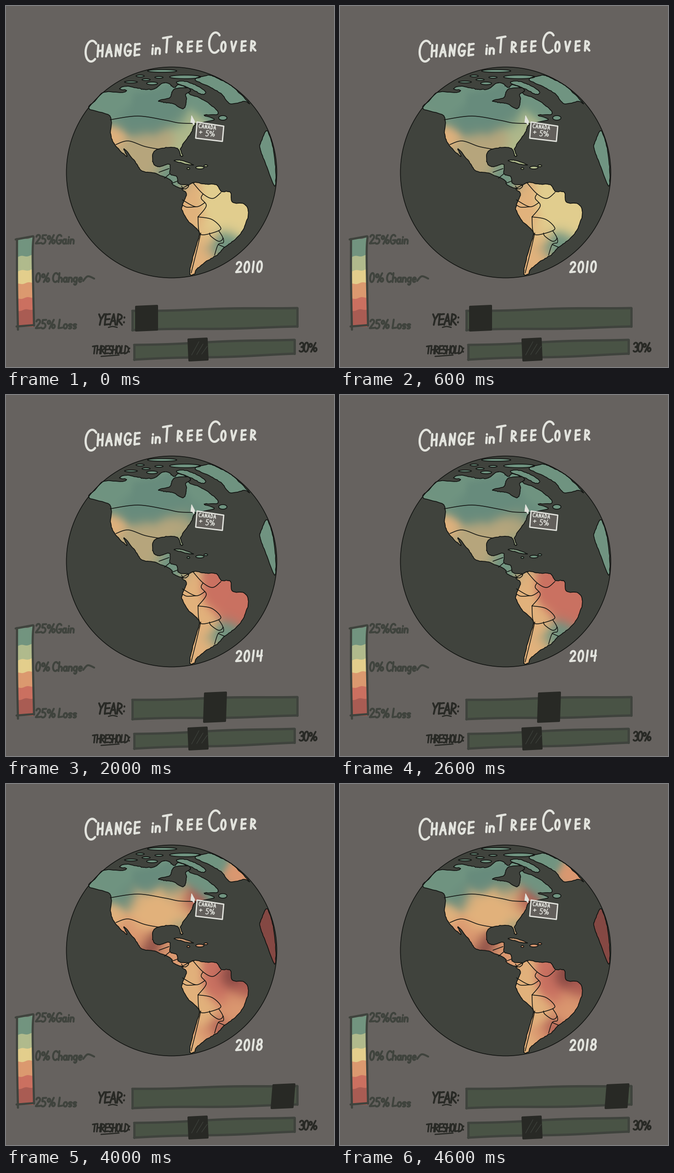
A matplotlib script that plays this animation: 714x784 px, repeating every 5000 ms.

```python
from itertools import count

import numpy as np
import matplotlib.pyplot as plt
from matplotlib.animation import FuncAnimation
from matplotlib.collections import LineCollection
from matplotlib.patches import Circle, PathPatch, Polygon
from matplotlib.path import Path

W, H, DPI = 714, 784, 64
PX = 72 / DPI

BACK, SEA, INK = "#66625f", "#40433d", "#121412"
CHALK, EDGE, BAR, DARK = "#e2e3dd", "#3f433d", "#495345", "#282925"

SHADES = dict(teal="#709481", pine="#678b7c", green="#b0ba8c", sand="#e2ce8f",
              tan="#b7a67c", moss="#a8a47d", peach="#e2b27c", orange="#db9870",
              red="#ca7161", brick="#ac5b52", wine="#854843")

rng = np.random.default_rng(4)
layer = count(2)

# ---- curves -----------------------------------------------------------


def line(*flat):
    return np.reshape(np.array(flat, float), (-1, 2))


def arc(cx, cy, rx, ry, start=0, end=360):
    a = np.radians(np.linspace(start, end, 24))
    return np.column_stack([cx + rx * np.cos(a), cy + ry * np.sin(a)])


def join(*parts):
    return np.vstack(parts)


def curve(*flat, closed=False):
    """Catmull-Rom spline through the given points."""
    p = line(*flat)
    p = join(p[-1], p, p[:2]) if closed else join(p[0], p, p[-1])
    t = np.linspace(0, 1, 8, endpoint=False)[:, None]
    out = [.5 * (2 * b + (c - a) * t + (2 * a - 5 * b + 4 * c - d) * t**2
                 + (3 * b - a - 3 * c + d) * t**3)
           for a, b, c, d in zip(p, p[1:], p[2:], p[3:])]
    return join(*out, p[-2])


def coast(*flat):
    """Closed shore with a slightly shaky pen."""
    p = curve(*flat, closed=True)
    p[:-1] += rng.normal(0, .35, p[:-1].shape)
    p[-1] = p[0]
    return p


# ---- pen letters on a grid ten units high: (width, strokes) -----------
STEM = line(.5, 0, .4, 10)
BOWL = arc(2.1, 7.4, 1.7, 2.5, -20, -340)
ARCH = join(arc(2.2, 7, 1.7, 2, 180, 360), line(3.9, 9.8))
RING = arc(2.5, 5, 2.2, 5, -70, 290)
HOOK = arc(3.2, 5, 2.9, 5, -45, -310)
SNAKE = join(arc(2.4, 2.6, 1.9, 2.5, -30, -270), arc(2, 7.4, 2, 2.6, -90, 120))


def bars(*heights):
    return [line(.4, y, 4.4, y - .4) for y in heights]


def small(stroke):
    return stroke * (.85, .5) + (0, 5)


GLYPHS = {
    " ": (1, []),
    "0": (5, [RING]),
    "1": (1.8, [line(1, 0, .8, 10)]),
    "2": (5, [join(arc(2.4, 2.5, 2.1, 2.4, 190, 390), line(.4, 9.6, 5, 9.3))]),
    "3": (4.6, [join(arc(2, 2.5, 2, 2.4, 200, 450), arc(2.2, 7.3, 2.4, 2.6, -90, 140))]),
    "4": (5, [line(.6, .5, .4, 5.5, 4.8, 5), line(4.2, 0, 4, 10)]),
    "5": (5, [join(line(4.8, .3, 1, .5, .8, 4.2), arc(2, 7, 2.6, 2.9, -110, 140))]),
    "6": (5, [join(line(3.6, 0), arc(2.6, 7.2, 2.1, 2.7, 190, -150))]),
    "8": (5, [arc(2.6, 2.4, 1.8, 2.4), arc(2.5, 7.3, 2.2, 2.7)]),
    "%": (9, [arc(1.8, 3, 1.4, 1.8), line(7, .2, 3, 10), arc(7.3, 7.6, 1.5, 2)]),
    "+": (4, [line(2, 3, 2, 7), line(0, 5, 4, 5)]),
    ":": (1.2, [line(.6, y, .6, y + .4) for y in (3, 7.4)]),
    "A": (5, [line(0, 10, 2.4, 0, 5, 10), line(1, 6.5, 4.3, 6.2)]),
    "C": (5.2, [HOOK]),
    "D": (5, [STEM, arc(.6, 5, 4.2, 4.8, -90, 90)]),
    "E": (4.4, [STEM, *bars(.4, 5, 9.8)]),
    "G": (5.8, [HOOK, line(3, 6, 5.8, 5.8, 5, 9)]),
    "H": (4.8, [STEM, STEM + (4, 0), *bars(5.2)]),
    "L": (4.6, [line(1, 0, .5, 9.6, 4.6, 9)]),
    "N": (5, [line(.4, 10, .7, .4, 4.2, 9.6, 4.8, 0)]),
    "O": (5, [RING]),
    "R": (5, [STEM, arc(.6, 2.8, 3.6, 2.6, -90, 90), line(.8, 5.4, 5, 10)]),
    "S": (4.2, [SNAKE]),
    "T": (5.4, [line(0, .8, 5.4, 0), line(2.8, .4, 2.6, 10)]),
    "V": (5, [line(0, 0, 2.2, 10, 5, 0)]),
    "Y": (5, [line(.2, .2, 2.5, 4.8), line(5, 0, 2.4, 5.2, 1.8, 10)]),
    "a": (4.4, [BOWL, line(3.8, 5, 3.8, 8.5, 4.4, 9.8)]),
    "e": (4.4, [join(line(.5, 7.3, 3.6, 7), arc(2.1, 7.4, 1.7, 2.5, -10, -310))]),
    "g": (4.4, [BOWL, join(line(3.8, 5), arc(2.4, 11, 1.4, 2, 0, 140))]),
    "h": (4.2, [STEM, ARCH]),
    "i": (1.6, [line(.9, 5, .8, 9.8), line(1, 2.4, 1, 2.7)]),
    "n": (4.2, [line(.5, 5, .4, 9.8), ARCH]),
    "o": (4.2, [small(RING)]),
    "s": (3.8, [small(SNAKE)]),
}

# ---- shores and borders -----------------------------------------------
MAINLAND = coast(
    181, 223, 196, 204, 214, 187, 252, 188, 262, 183, 247, 180, 262, 174, 285, 178,
    301, 181, 323, 180, 340, 168, 354, 168, 366, 177, 376, 171, 397, 178, 399, 191,
    420, 199, 446, 215, 462, 234, 431, 237, 453, 247, 413, 257, 402, 277, 381, 308,
    385, 325, 380, 325, 373, 309, 344, 308, 322, 317, 320, 340, 332, 349, 356, 344,
    357, 364, 372, 371, 376, 386, 397, 389, 389, 397, 365, 389, 357, 377, 323, 363,
    296, 358, 281, 338, 257, 310, 263, 327, 239, 304, 228, 280, 226, 239)
SOUTH = coast(
    383, 398, 397, 389, 411, 383, 434, 387, 458, 388, 469, 403, 488, 404, 493, 426,
    518, 430, 528, 448, 518, 482, 502, 504, 476, 524, 459, 541, 434, 556, 414, 573,
    411, 581, 401, 583, 403, 560, 414, 520, 420, 490, 396, 466, 383, 438, 393, 408)
GREENLAND = coast(411, 160, 433, 152, 450, 152, 487, 171, 507, 188, 530, 212,
                  519, 207, 488, 212, 470, 192, 446, 177)
AFRICA = coast(568, 271, 555, 296, 553, 309, 566, 345, 585, 391, 587, 355, 580, 303)
BAFFIN = coast(371, 167, 386, 163, 411, 171, 434, 186, 427, 192, 405, 181)
BAY = coast(332, 206, 356, 199, 362, 186, 370, 179, 397, 178, 401, 185, 391, 192,
            393, 203, 386, 223, 366, 213, 349, 210)
ISLES = [arc(*e) for e in (
    (340, 141, 32, 3), (390, 154, 34, 4), (272, 165, 14, 2), (305, 160, 9, 2),
    (318, 168, 12, 3), (333, 155, 9, 2), (292, 152, 9, 2), (472, 243, 9, 5),
    (422, 351, 9, 3), (435, 347, 4, 2), (397, 353, 3, 2))]
CUBA = coast(366, 336, 380, 335, 408, 345, 390, 343)

BORDERS = [curve(*b) for b in (
    (227, 247, 287, 239, 347, 248, 377, 254, 414, 255),
    (239, 301, 266, 293, 302, 305, 333, 311),
    (333, 361, 355, 353), (345, 374, 357, 364), (361, 385, 374, 380), (382, 391, 386, 398),
    (407, 384, 429, 408, 450, 418, 468, 405),
    (429, 408, 425, 418, 436, 434, 418, 458),
    (384, 421, 413, 436, 433, 427), (384, 432, 394, 437, 413, 436),
    (418, 458, 447, 463, 466, 479, 463, 488, 430, 497, 420, 489, 418, 458),
    (443, 493, 446, 500, 463, 511, 472, 504, 463, 488),
    (473, 504, 473, 514, 462, 518, 454, 541), (462, 518, 476, 524),
    (424, 493, 415, 532, 403, 580))]

# ---- tree cover by place and year -------------------------------------
PLACES = dict(
    alaska=(195, 212), yukon=(238, 203), pacific=(235, 232), arctic=(300, 155),
    prairie=(310, 213), plains=(262, 248), ontario=(365, 222), labrador=(428, 217),
    baffin=(410, 178), greenland=(455, 170), cape=(503, 197), fishery=(472, 243),
    africa=(570, 330), west=(236, 285), rockies=(290, 261), midwest=(332, 253),
    lakes=(372, 245), northeast=(402, 255), east=(382, 276), heartland=(297, 297),
    gulf=(348, 288), florida=(384, 316), sonora=(266, 315), mexico=(292, 338),
    yucatan=(317, 353), isthmus=(347, 366), canal=(372, 381), cuba=(385, 339),
    antilles=(425, 350), orinoco=(402, 398), guiana=(452, 399), peru=(400, 437),
    andes=(412, 468), amazon=(455, 435), delta=(487, 421), shore=(512, 445),
    savanna=(468, 460), upland=(490, 474), bay=(508, 478), coffee=(484, 507),
    plate=(463, 527), chaco=(432, 505), highland=(440, 486), pampa=(438, 548),
    chile=(410, 566))

BASE = dict(
    teal="alaska yukon pacific arctic labrador baffin greenland cape fishery africa "
         "isthmus canal cuba antilles coffee plate",
    pine="prairie plains ontario rockies midwest lakes northeast",
    tan="east heartland gulf sonora mexico yucatan", moss="florida",
    peach="west orinoco peru andes chaco highland pampa chile",
    sand="guiana amazon delta shore savanna upland bay")
YEARS = {
    2010: dict(green="northeast east florida cuba antilles", sand="highland"),
    2012: dict(green="canal orinoco guiana pampa chile", sand="sonora",
               red="amazon savanna upland"),
    2014: dict(red="guiana amazon delta shore savanna upland bay"),
    2016: dict(sand="cape fishery rockies midwest heartland gulf",
               moss="northeast east", tan="lakes gulf",
               red="yucatan cuba guiana amazon delta shore savanna upland bay pampa",
               brick="africa isthmus canal orinoco coffee plate"),
    2018: dict(peach="rockies midwest heartland lakes gulf east",
               orange="cape sonora mexico isthmus canal cuba antilles upland bay "
                      "coffee pampa",
               red="guiana amazon savanna", brick="northeast shore plate",
               wine="africa yucatan delta"),
}


def heat(change, spread=16):
    """Blend the shades of all places softly over the globe."""
    shade = {p: s for group in (BASE, change)
             for s, names in group.items() for p in names.split()}
    x, y = np.meshgrid(np.arange(131, 592, 2), np.arange(131, 592, 2))
    d = np.array([(x - px)**2 + (y - py)**2 for px, py in PLACES.values()])
    w = np.exp((d.min(axis=0) - d) / (2 * spread**2))
    rgb = [plt.matplotlib.colors.to_rgb(SHADES[shade[p]]) for p in PLACES]
    return np.tensordot(w / w.sum(axis=0), np.array(rgb), axes=(0, 0))


# ---- drawing ----------------------------------------------------------


def put(artist):
    """Add an artist on top of everything drawn so far."""
    artist.set_zorder(next(layer))
    return ax.add_artist(artist)


def ink(lines, color, width):
    return put(LineCollection(lines, colors=color, linewidths=width * PX,
                              capstyle="round", joinstyle="round"))


def shape(points, color, edge="none", width=0):
    return put(Polygon(points, fc=color, ec=edge, lw=width * PX, joinstyle="round"))


def letters(text, x, y, unit, tilt=0., gap=1.3, lean=.1):
    """Pen lines for text whose top left corner is x, y."""
    lines, pen = [], 0
    for ch in text:
        width, parts = GLYPHS[ch]
        for part in parts:
            px = (part[:, 0] + pen + lean * (5 - part[:, 1])) * unit
            lines.append(np.column_stack([x + px, y + part[:, 1] * unit + tilt * px]))
        pen += width + gap
    return lines


def slider(x0, x1, top, low, rise):
    """Hand-drawn track that climbs to the right."""
    x = np.linspace(x0, x1, 30)
    wave = np.sin((x - x0) / 45)
    up = np.column_stack([x, top - rise * (x - x0) / (x1 - x0) + wave])
    down = np.column_stack([x, low - rise * (x - x0) / (x1 - x0) - wave])
    shape(join(up, down[::-1]), BAR)
    ink([up, down, join(up[0], down[0]), join(up[-1], down[-1])], EDGE, 5)


def knob_shape(x, y, half_w, half_h, lean):
    return line(x - half_w - lean, y - half_h + 1, x + half_w - lean, y - half_h - 1,
                x + half_w + lean, y + half_h - 1, x - half_w + lean, y + half_h + 1)


fig = plt.figure(figsize=(W / DPI, H / DPI), dpi=DPI, facecolor=BACK)
ax = fig.add_axes([0, 0, 1, 1])
ax.axis("off")

# Globe
maps = [heat(change) for change in YEARS.values()]
ground = ax.imshow(maps[0], extent=(130, 592, 592, 130), aspect="auto",
                   interpolation="bilinear")
ax.set(xlim=(0, W), ylim=(H, 0))
put(Circle((360.5, 361.5), 229, fc=SEA, ec="none"))
shores = [MAINLAND, SOUTH, GREENLAND, AFRICA, BAFFIN, CUBA, *ISLES]
land = Path.make_compound_path(*[Path(s, closed=True) for s in shores])
ground.set_clip_path(land, ax.transData)
ground.set_zorder(next(layer))
put(PathPatch(land, fc="none", ec=INK, lw=1.7 * PX))
shape(BAY, SEA, INK, 1.7)
ink(BORDERS, INK, 1.6)
put(Circle((360.5, 361.5), 229, fc="none", ec=INK, lw=1.6 * PX))

# Title
for text, x, y, unit, gap in (
        ("C", 172, 76, 4.5, 0), ("HANGE", 199, 85, 2.5, 2.9), ("in", 317, 79, 2.6, 1.5),
        ("T", 341, 67, 3.4, 0), ("REE", 373, 78, 2.2, 5), ("C", 441, 58, 4.4, 0),
        ("OVER", 468, 78, 2.1, 5.5)):
    ink(letters(text, x, y, unit, -.03, gap, .05), CHALK, 4.8)

# Tooltip and pointer
shape(line(416, 252, 474, 261, 471, 294, 413, 287), "#625f5b", CHALK, 2.8)
ink(letters("CANADA", 420, 256, .85, .11, 2.6), CHALK, 1.7)
ink(letters("+", 421, 267, 1.4) + letters("5%", 435, 270, 1.25, .05), CHALK, 1.7)
shape(line(404, 238, 411, 251, 409, 258, 406, 254, 402, 253), CHALK, CHALK, 1)

# Legend
BANDS = ["#72947f", "#b0ba8c", "#e3ce8c", "#db996f", "#cb7060", "#a95c53"]
LEVELS = [505, 543, 574, 602, 634, 660, 694]
bx = np.linspace(25, 60, 20)
for color, top, low in zip(BANDS, LEVELS, LEVELS[1:]):
    brim = np.column_stack([bx, top + 1.3 * np.sin(bx / 4 + top) - (bx - 42) * .1])
    shape(join(brim, line(60, low + 3, 25, low + 3)), color)
ink([curve(21, 507, 59, 500), curve(24, 506, 24, 600, 26, 703),
     curve(60, 501, 58, 545, 61, 694), curve(23, 696, 61, 693)], EDGE, 4.6)
for text, y in (("25%Gain", 497), ("0% Change", 580), ("25% Loss", 681)):
    ink(letters(text, 65, y, 1.95), EDGE, 4.2)
ink([curve(168, 597, 178, 587, 192, 592)], EDGE, 4.2)

# Sliders
slider(275, 634, 662, 704, 7)
slider(279, 628, 736, 768, 12)
shape(knob_shape(418, 746, 20, 23, 1), DARK, DARK, 4)
ink([line(404 + 11 * k, 758 - k, 420 + 9 * k, 729 + 5 * k) for k in range(3)], EDGE, 1.2)
ink(letters("YEAR:", 201, 669, 2.35, gap=1), DARK, 4)
ink(letters("THRESHOLD:", 188, 738, 1.7, gap=.4), DARK, 3.4)
ink([curve(223, 698, 232, 696, 242, 698), curve(207, 761, 246, 758)], DARK, 2.6)
ink(letters("30%", 639, 731, 2, gap=.2), DARK, 3.8)

# Year knob: centre, half height and lean at each stop
STOPS = [(306, 26, 0), (373, 27, 1), (455, 31, -1), (541, 26, 3), (603, 25, -2)]
knob = shape(knob_shape(306, 679, 23, 26, 0), DARK, DARK, 4)
label = ink([], CHALK, 4.4)


def draw(i):
    x, half, lean = STOPS[i]
    ground.set_data(maps[i])
    knob.set_xy(knob_shape(x, 678, 23, half, lean))
    label.set_segments(letters(str(list(YEARS)[i]), 501, 556, 2.3, -.03, 2.6))
    return ground, knob, label


anim = FuncAnimation(fig, draw, frames=len(YEARS), interval=1000, repeat=True,
                     repeat_delay=0)
plt.show()
```
